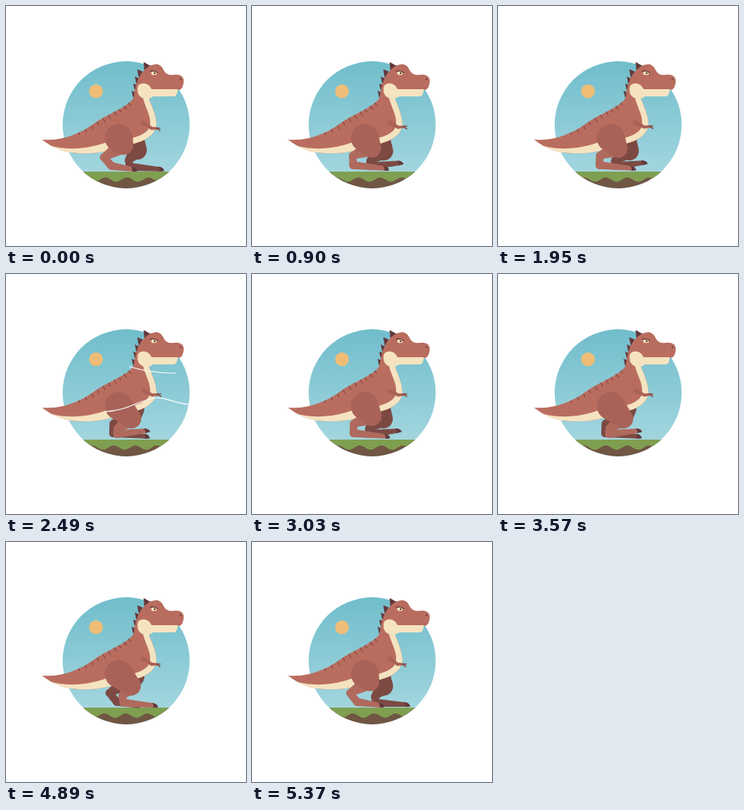
Write an HTML page with a canvas that moves like this. It is 300 by 300 pixels and loops after 5400 ms.

```html
<!DOCTYPE html>
<html lang="en">
<head>
<meta charset="utf-8">
<title>Walking dinosaur</title>
<style>
  html, body { margin: 0; width: 100%; height: 100%; overflow: hidden; background: #fff; }
  canvas { display: block; width: 300px; height: 300px; }
</style>
</head>
<body>
<canvas id="stage" width="300" height="300"></canvas>
<script>
const c = document.getElementById('stage').getContext('2d');
const LOOP = 5400, STEP = 1080;
const SKIN = '#b96d5f', THIGH = '#a96257', FAR = '#7c4a43', CREAM = '#f5e3c0', DARK = '#63383a';

const sky = c.createLinearGradient(0, 69, 0, 210);
sky.addColorStop(0, '#70bdcb');
sky.addColorStop(1, '#a3d6df');

const shapes = {
  body: new Path2D(`M45 167C70 169 92 160 110 147C126 135 157 125 160 113
    C161 103 164 88 174 79C179 74 186 72 190 73C196 75 196 80 200 84
    C205 88 210 85 215 86C221 87 223 91 222 96C221 102 219 105 215 105L178 113
    C180 122 188 134 188 148C187 162 172 170 155 173C139 177 125 184 104 184
    C80 186 60 179 45 167Z`),
  belly: new Path2D(`M171 113L178 113C180 122 188 134 188 148C187 162 172 170 155 173
    C139 177 125 184 104 184C85 185 69 182 57 175C82 181 104 178 127 170
    C150 167 176 164 180 150C182 136 173 126 171 113Z`),
  jaw: new Path2D(`M167 98C172 95 179 97 182 104L215 104C214 109 213 113 210 113
    L184 113C178 118 168 117 165 109C164 104 164 100 167 98Z`),
  spikes: new Path2D(`M172 70L181 75L173 81ZM164 79L171 82L166 90Z
    M161 88L167 91L163 98ZM159 97L164 99L161 106ZM157 106L162 108L159 115Z`),
  stripes: new Path2D(`M153 121l3 3M147 125l4 4M141 129l3 4M135 132l3 5
    M128 136l3 5M121 140l3 5M114 145l2 4M107 150l2 4M99 154l2 4M91 158l1 3`),
  gustLow: new Path2D('M229 163C211 162 201 154 188 155C166 157 152 171 124 172'),
  gustHigh: new Path2D('M212 124C198 124 188 123 176 121C166 119 158 117 150 114')
};

// Phase, then knee, ankle, heel and toe of the near leg.
const poses = [
  [0, 147, 174, 122, 189, 132, 200, 158, 204],
  [90, 149, 175, 124, 188, 130, 199, 150, 204],
  [330, 157, 181, 139, 193, 139, 200, 174, 196],
  [540, 157, 180, 146, 193, 148, 201, 185, 204],
  [870, 150, 178, 127, 187, 127, 199, 167, 203]
];

function fill(path, color) {
  c.fillStyle = color;
  c.fill(path);
}

function disc(x, y, r, color) {
  c.fillStyle = color;
  c.beginPath();
  c.arc(x, y, r, 0, 7);
  c.fill();
}

function limb(x1, y1, r1, x2, y2, r2, color) {
  const a = Math.atan2(y2 - y1, x2 - x1);
  const b = Math.acos(Math.max(-1, Math.min(1, (r1 - r2) / Math.hypot(x2 - x1, y2 - y1))));
  c.fillStyle = color;
  c.beginPath();
  c.arc(x1, y1, r1, a + b, a - b + 2 * Math.PI);
  c.arc(x2, y2, r2, a - b, a + b);
  c.fill();
}

// Smooth periodic interpolation of the poses.
function poseAt(phase) {
  const n = poses.length;
  const at = i => {
    const turn = Math.floor(i / n), p = poses[i - turn * n];
    return [p[0] + turn * STEP, ...p.slice(1)];
  };
  let i = n - 1;
  while (poses[i][0] > phase) i--;
  const [p, a, b, q] = [at(i - 1), at(i), at(i + 1), at(i + 2)];
  const span = b[0] - a[0], u = (phase - a[0]) / span;
  return a.slice(1).map((v, k) => {
    const j = k + 1;
    const m0 = (b[j] - p[j]) / (b[0] - p[0]) * span;
    const m1 = (q[j] - a[j]) / (q[0] - a[0]) * span;
    const d = b[j] - v;
    return v + u * (m0 + u * (3 * d - 2 * m0 - m1 + u * (m0 + m1 - 2 * d)));
  });
}

function leg(phase, shift, hipX, hipY, hipR, thigh, shin) {
  const [kx, ky, ax, ay, hx, hy, tx, ty] = poseAt(phase % STEP).map((v, i) => i % 2 ? v : v + shift);
  limb(kx, ky, 10, ax, ay, 4.5, shin);
  limb(ax, ay, 4.5, hx, hy, 5, shin);
  limb(hx, hy, 5, tx, ty, 2.8, shin);
  limb(hipX, hipY, hipR, kx, ky, 12, thigh);
  c.save();
  c.translate(tx, ty);
  c.rotate(Math.atan2(ty - hy, tx - hx));
  fill(new Path2D('M-2 -3Q5 -3 6 2L0 3Q1 0 -2 -3Z'), DARK);
  c.restore();
}

function ground(t) {
  c.fillStyle = '#705643';
  c.fillRect(70, 207, 162, 22);
  c.fillStyle = '#7f9f50';
  c.beginPath();
  c.moveTo(70, 207);
  for (let x = 70; x <= 232; x += 2)
    c.lineTo(x, 217 + 2.7 * Math.sin((x + 4 + t * 0.05) / 27 * 2 * Math.PI));
  c.lineTo(232, 207);
  c.fill();
}

function arm(t) {
  c.save();
  c.translate(172, 146);
  c.rotate(0.09 + 0.08 * Math.cos(t / 540 * 2 * Math.PI));
  limb(0, 0, 2.6, 11, 5, 1.9, THIGH);
  limb(11, 5, 1.9, 18, 4, 1.4, THIGH);
  c.strokeStyle = '#8a4a43';
  c.lineWidth = 1.5;
  c.stroke(new Path2D('M17 4L22 3M17 4Q21 5 22 7'));
  c.restore();
}

function gust(path, length, t, start) {
  const u = (t - start) / 600;
  if (u <= 0 || u >= 1) return;
  const head = Math.min(1, u * 2.2) * length;
  const tail = Math.max(0, u * 2 - 1) * length;
  if (head <= tail) return;
  c.save();
  c.strokeStyle = '#f4fbfc';
  c.lineWidth = 1.2;
  c.setLineDash([head - tail, 2 * length]);
  c.lineDashOffset = -tail;
  c.stroke(path);
  c.restore();
}

function draw(t) {
  c.clearRect(0, 0, 300, 300);
  c.save();
  c.beginPath();
  c.arc(150.2, 148.5, 79.4, 0, 7);
  c.clip();
  c.fillStyle = sky;
  c.fillRect(70, 69, 162, 160);
  disc(112.5, 106.7, 8.6, '#efbd76');
  ground(t);
  c.restore();

  leg(t + STEP / 2, 7, 160, 168, 13, FAR, FAR);
  fill(shapes.spikes, DARK);
  fill(shapes.body, SKIN);
  fill(shapes.belly, CREAM);
  fill(shapes.jaw, CREAM);
  c.strokeStyle = '#844a43';
  c.lineWidth = 1.2;
  c.stroke(shapes.stripes);

  c.fillStyle = '#f6ebc3';
  c.beginPath();
  c.ellipse(185, 84, 3.6, 2.2, 0.1, 0, 7);
  c.fill();
  disc(185.8, 84, 1.2, DARK);
  c.strokeStyle = DARK;
  c.stroke(new Path2D('M180 81.5Q185 80 190 83.5'));
  disc(218, 91.5, 1.1, DARK);

  arm(t);
  leg(t, 0, 141, 165, 17.5, THIGH, '#b06a5d');
  gust(shapes.gustLow, 116, t, 2200);
  gust(shapes.gustHigh, 64, t, 2240);
}

const begin = performance.now();
function frame() {
  const t = (performance.now() - begin) % LOOP;
  draw(Math.floor(t / 30) * 30);
  requestAnimationFrame(frame);
}
frame();
</script>
</body>
</html>
```
